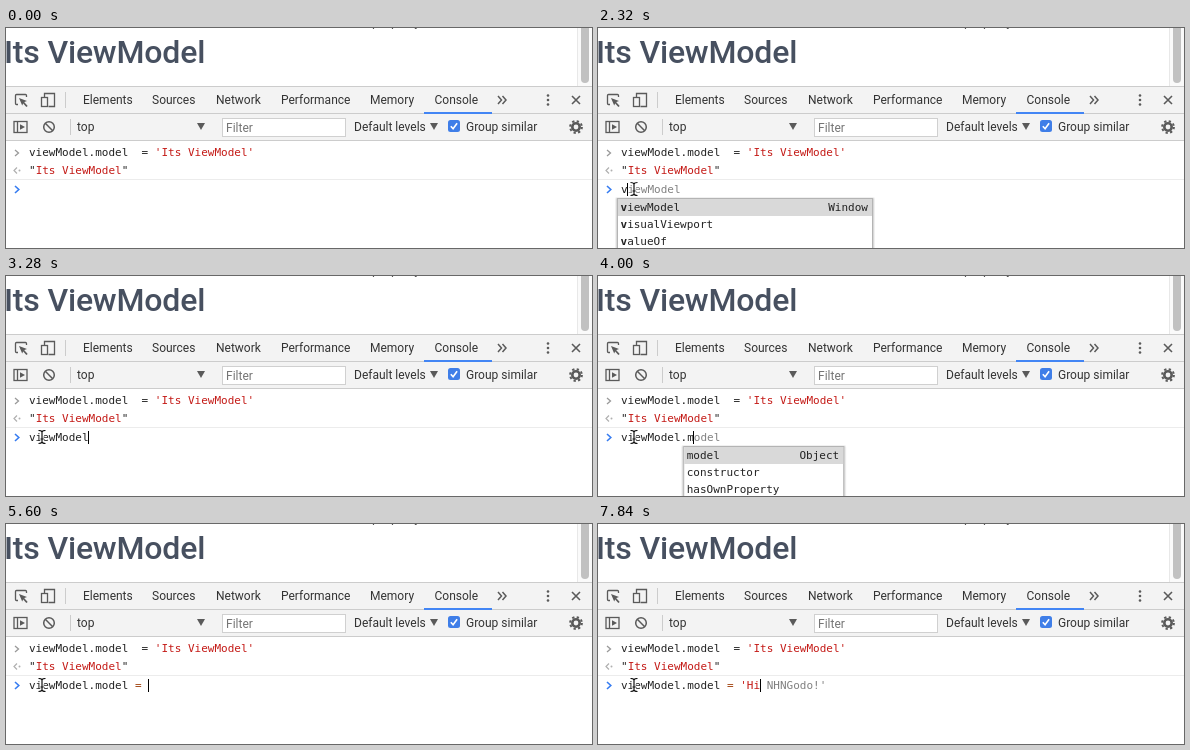
An HTML page that plays this animation: 586 by 220 pixels, repeating every 8000 ms.

```html
<!DOCTYPE html>
<html lang="en">
<head>
<meta charset="utf-8">
<title>Console session</title>
<style>
html, body { margin: 0; width: 100%; height: 100%; overflow: hidden; background: #fff; }
svg { display: block; width: 586px; height: 220px; }
text { white-space: pre; }
.ui { font: 12px Roboto, sans-serif; fill: #333; }
.code { font: 11px "DejaVu Sans Mono", monospace; fill: #222; }
.str { fill: #c41a16; }
.op { fill: #a0410d; }
.ghost { fill: #808080; }
.bold { font-weight: 700; }
.icon { fill: none; stroke: #5a5a5a; stroke-width: 1.3; }
.solid { fill: #5a5a5a; }
.rule { fill: #ccc; }
</style>
</head>
<body>
<svg viewBox="0 0 586 220" width="586" height="220">
  <rect width="586" height="220" fill="#fff"/>

  <!-- page -->
  <text x="366" y="-2" font-family="Roboto, sans-serif" font-size="13" fill="#555">property</text>
  <text x="-2" y="35" font-family="Roboto, sans-serif" font-size="32" font-weight="500" fill="#475060" letter-spacing="-.2">Its ViewModel</text>
  <rect x="571" width="15" height="58" fill="#fafafa"/>
  <rect x="571" width="1" height="58" fill="#e8e8e8"/>
  <rect x="575" y="-10" width="8" height="65" rx="4" fill="#c1c1c1"/>

  <!-- toolbars -->
  <rect y="58" width="586" height="54" fill="#f3f3f3"/>
  <rect class="rule" y="58" width="586" height="1"/>
  <rect class="rule" y="85" width="586" height="1"/>
  <rect class="rule" y="112" width="586" height="1"/>
  <rect class="rule" x="59" y="64" width="1" height="16"/>
  <rect class="rule" x="64" y="91" width="1" height="16"/>
  <rect x="418" y="84" width="68" height="2" fill="#4285f4"/>
  <g class="ui" id="labels"></g>

  <g class="icon">
    <path d="M12 76.500H10.500a1 1 0 0 1-1-1V67.500a1 1 0 0 1 1-1H19.500a1 1 0 0 1 1 1V69"/>
    <path d="M17 74l4 4.500" stroke-width="1.800"/>
    <path d="M38.500 69V65.500H48.500V78.500H42.500"/>
    <rect x="35.500" y="69.500" width="6" height="9"/>
    <path d="M492 68l3.500 4-3.500 4M496.500 68l3.500 4-3.500 4" stroke-width="1.500"/>
    <path d="M566 68l8 8M574 68l-8 8" stroke-width="1.600"/>
    <rect x="8" y="93.500" width="13" height="11"/>
    <path d="M11.500 93.500v11"/>
    <circle cx="43" cy="99" r="5.300" stroke-width="1.500"/>
    <path d="M39.300 95.300l7.400 7.400" stroke-width="1.500"/>
    <circle cx="570" cy="99" r="3.700" stroke-width="2.600"/>
    <circle cx="570" cy="99" r="5.900" stroke-width="2" stroke-dasharray="2.300 2.334"/>
  </g>
  <g class="solid">
    <path d="M13 70l8 3-3.300 1.200-1.500 3.300z"/>
    <path d="M14 96.300l5 2.700-5 2.700z"/>
    <path d="M191 95h8l-4 7z"/>
    <path d="M424 95h8l-4 7z"/>
    <circle cx="542" cy="67.500" r="1.300"/>
    <circle cx="542" cy="72" r="1.300"/>
    <circle cx="542" cy="76.500" r="1.300"/>
  </g>
  <rect x="216.500" y="90.500" width="123" height="18" fill="#fff" stroke="#d0d0d0"/>
  <text class="ui" x="220" y="104" style="fill:#757575">Filter</text>
  <rect x="442" y="92" width="12" height="12" rx="2.500" fill="#3f7ee8"/>
  <path d="M444.800 98.200l2.300 2.600 4-5.600" fill="none" stroke="#fff" stroke-width="1.600"/>

  <!-- messages -->
  <path d="M9 122l3.500 3-3.500 3" fill="none" stroke="#999" stroke-width="1.300"/>
  <path d="M11 139.500l-3 3 3 3" fill="none" stroke="#b0b0b0" stroke-width="1.200"/>
  <circle cx="13.500" cy="142.500" r="1" fill="#b0b0b0"/>
  <text class="code" x="23" y="128">viewModel.model  = <tspan class="str">'Its ViewModel'</tspan></text>
  <text class="code" x="23" y="146">"<tspan class="str">Its ViewModel</tspan>"</text>
  <rect y="151" width="586" height="1" fill="#ececec"/>
  <path d="M9 158l3.800 3.500-3.800 3.500" fill="none" stroke="#367cf1" stroke-width="1.600"/>

  <text class="code" id="line" x="23" y="165"></text>
  <rect id="caret" y="155" width="1" height="13" fill="#000"/>
  <g id="popup"></g>
  <g id="mouse" fill="none">
    <path id="beam" d="M-3.500-6.500Q-.5-6.500 0-5Q.5-6.500 3.500-6.500M0-5V5M-3.500 6.500Q-.5 6.500 0 5Q.5 6.500 3.500 6.500M-1.500 2H1.500" stroke="#fff" stroke-width="3"/>
    <use href="#beam" style="stroke:#000"/>
    <path d="M-3.500-6.500Q-.5-6.500 0-5Q.5-6.500 3.500-6.500M0-5V5M-3.500 6.500Q-.5 6.500 0 5Q.5 6.500 3.500 6.500M-1.500 2H1.500" stroke="#111" stroke-width="1.200"/>
  </g>
</svg>
<script>
const LOOP = 8000, CHAR = 6.622, LEFT = 23;
const $ = id => document.getElementById(id);

const labels = [
  [77, 76, "Elements"], [146, 76, "Sources"], [210, 76, "Network"],
  [275, 76, "Performance"], [364, 76, "Memory"], [428.5, 76, "Console"],
  [71, 103, "top"], [348, 103, "Default levels"], [460, 103, "Group similar"]
];
$("labels").innerHTML = labels.map(([x, y, s]) => `<text x="${x}" y="${y}">${s}</text>`).join("");

// Suggestion lists: column of the left edge, width, matched prefix, rows, type
const globals = (match, rows) => ({ col: 0, width: 256, match, rows, type: "Window" });
const views = ["viewModel", "DataView", "SVGViewElement"];
const members = { col: 10, width: 161, match: "", rows: ["model", "constructor", "hasOwnProperty"], type: "Object" };
const start = "viewModel.model = '";
const history = { col: 0, width: 242, match: start, rows: [start + "Hi NHNGodo!'", start + "Its ViewModel'"], type: "" };

// Prompt states: time, typed text, ghost text, suggestions, caret shown
const states = [
  [0, "", "", null, false],
  [1360, "", "", null, true],
  [2000, "", "", null, false],
  [2320, "v", "iewModel", globals("v", ["viewModel", "visualViewport", "valueOf"]), true],
  [2480, "vi", "ewModel", globals("vi", ["viewModel", "visualViewport", "DataView"]), true],
  [2560, "vie", "wModel", globals("vie", views), true],
  [2720, "view", "Model", globals("view", views), true],
  [2960, "viewM", "odel", globals("viewM", views), true],
  [3120, "viewMo", "del", globals("viewMo", views), true],
  [3280, "viewModel", "", null, true],
  [3680, "viewModel.", "model", members, true],
  [4000, "viewModel.m", "odel", members, true],
  [4080, "viewModel.m", "odel", null, true],
  [4400, "viewModel.", "model", members, true],
  [4640, "viewModel.m", "odel", members, true],
  [4720, "viewModel.m", "odel", null, true],
  [4800, "viewModel.mo", "del", null, true],
  [4960, "viewModel.model", "", null, true],
  [5360, "viewModel.model ", "", null, true],
  [5520, "viewModel.model =", "", null, true],
  [5600, "viewModel.model = ", "", null, true],
  [6160, "viewModel.model = ", "", null, false],
  [6320, start, "Hi NHNGodo!'", history, true],
  [6640, start + "H", "i NHNGodo!'", null, true],
  [6880, start + "Hi", " NHNGodo!'", null, true],
  [7360, start + "Hi", " NHNGodo!'", null, false],
  [7840, start + "Hi", " NHNGodo!'", null, true]
];

// Pointer path: time, x, y
const path = [[720, 23, 204], [880, 26, 186], [1040, 30, 172], [1200, 35, 159.5], [1520, 35, 159.5], [1680, 36, 161]];

const span = (cls, s) => s ? `<tspan class="${cls}">${s}</tspan>` : "";

function promptLine(typed, ghost) {
  const [, name, op, str] = typed.match(/^([^=]*)(=? ?)(.*)$/);
  return name + span("op", op) + span("str", str) + span("ghost", ghost);
}

function emphasise(row, match) {
  const at = match ? row.toLowerCase().indexOf(match.toLowerCase()) : -1;
  if (at < 0) return row;
  const end = at + match.length;
  return row.slice(0, at) + span("bold", row.slice(at, end)) + row.slice(end);
}

function popup(list) {
  if (!list) return "";
  const x = LEFT - 4 + list.col * CHAR, w = list.width, h = list.rows.length * 17 + 1;
  const frame = (d, op) => `<rect x="${x - d}" y="${170 - d + 1}" width="${w + 2 * d}" height="${h + 2 * d}" rx="${d}" fill="#000" opacity="${op}"/>`;
  const rows = list.rows.map((r, i) =>
    `<text class="code" x="${x + 3.5}" y="${183 + 17 * i}">${emphasise(r, list.match)}</text>`).join("");
  return frame(2, .06) + frame(1, .1) +
    `<rect x="${x + .5}" y="170.5" width="${w - 1}" height="${h}" fill="#fff" stroke="#b4b4b4"/>` +
    `<rect x="${x + 1}" y="171" width="${w - 2}" height="17" fill="#d9d9d9"/>` + rows +
    `<text class="code" x="${x + w - 5}" y="183" text-anchor="end">${list.type}</text>`;
}

function pointer(t) {
  const i = path.findIndex(p => p[0] > t);
  if (i < 0) return path[path.length - 1].slice(1);
  if (i === 0) return null;
  const [t0, x0, y0] = path[i - 1], [t1, x1, y1] = path[i], k = (t - t0) / (t1 - t0);
  return [x0 + (x1 - x0) * k, y0 + (y1 - y0) * k];
}

let shown = null;
function draw(time) {
  const t = Math.floor(time % LOOP / 80) * 80;
  const state = states.filter(s => s[0] <= t).pop();
  if (state !== shown) {
    const [, typed, ghost, list, caret] = shown = state;
    $("line").innerHTML = promptLine(typed, ghost);
    $("caret").setAttribute("x", Math.floor(LEFT + typed.length * CHAR));
    $("caret").style.display = caret ? "" : "none";
    $("popup").innerHTML = popup(list);
  }
  const at = pointer(t);
  $("mouse").style.display = at ? "" : "none";
  if (at) $("mouse").setAttribute("transform", `translate(${at})`);
}

const begin = performance.now();
function tick() {
  draw(performance.now() - begin);
  requestAnimationFrame(tick);
}
draw(0);
requestAnimationFrame(tick);
</script>
</body>
</html>
```
